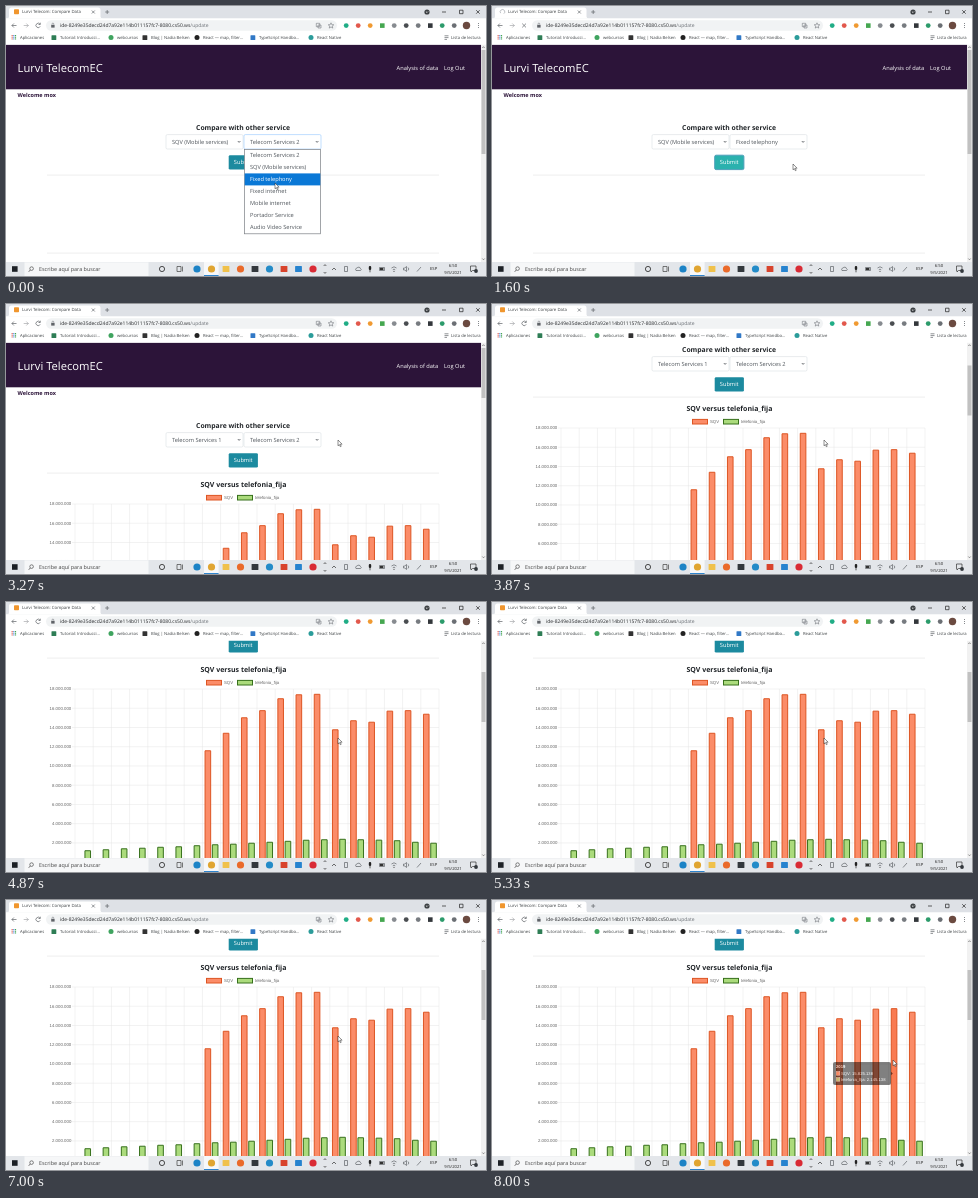
Animation, 480 px wide and 270 px high, one loop 8.07 s. Source, as an HTML page:

```html
<!DOCTYPE html>
<html lang="es">
<head>
<meta charset="utf-8">
<title>Compare Data</title>
<style>
html, body { margin: 0; width: 100%; height: 100%; overflow: hidden; background: #fff; }
svg { display: block; width: 100%; height: 100%; }
text { font-family: "Open Sans", "Noto Sans", sans-serif; text-rendering: geometricPrecision; white-space: pre; }
.b { font-weight: 700; }
.c { text-anchor: middle; }
.r { text-anchor: end; }
.h { font-family: "Liberation Sans", Arial, sans-serif; }
.line { fill: none; stroke: #5f6368; stroke-width: .7; }
</style>
</head>
<body>
<svg id="stage" viewBox="0 0 480 270" xmlns="http://www.w3.org/2000/svg"></svg>
<script>
const LOOP = 8070, FPS = 15;
const svg = document.getElementById('stage');

// markup helpers; text is placed by its vertical centre
const text = (x, cy, size, str, fill = '#3c4043', cls = '', id = '') =>
  `<text x="${x}" y="${(cy + size * .32).toFixed(2)}" font-size="${size}" fill="${fill}" class="${cls}" id="${id}">${str}</text>`;
const rect = (x, y, w, h, fill, more = '') =>
  `<rect x="${x}" y="${y}" width="${w}" height="${h}" fill="${fill}" ${more}/>`;
const dot = (x, y, r, fill, more = '') => `<circle cx="${x}" cy="${y}" r="${r}" fill="${fill}" ${more}/>`;
const path = (d, more = '') => `<path d="${d}" class="line" ${more}/>`;
const group = (id, body, more = '') => `<g id="${id}" ${more}>${body}</g>`;

// chart geometry, in page coordinates
const LEFT = 69, COL = 18.2, TOP = 200, ROW = 19.24, BASE = TOP + 9 * ROW, UNIT = ROW / 2;
const mobile = [0, 0, 0, 0, 0, 0, 0, 11.63, 13.45, 15.06, 15.8, 17.04, 17.45, 17.5, 13.81, 14.75, 14.6, 15.75, 15.8, 15.43];
const fixed = [1.24, 1.34, 1.44, 1.5, 1.6, 1.65, 1.76, 1.86, 1.92, 2.02, 2.12, 2.22, 2.33, 2.38, 2.43, 2.38, 2.34, 2.28, 2.12, 2.02];
const series = [
  { name: 'SQV', data: mobile, fill: '#fb8c68', hot: '#f97b52', line: '#dd5523', dx: -3.64 },
  { name: 'telefonia_fija', data: fixed, fill: '#abdb7c', hot: '#9bd164', line: '#37701c', dx: 3.64 }
];
const dotted = n => String(Math.round(n)).replace(/\B(?=(\d{3})+$)/g, '.');

function browser() {
  let s = rect(0, 0, 480, 12.5, '#dee1e6')
    + '<path d="M1 12.5Q3 12.5 3 10.5V4Q3 1.5 5.500 1.500H92Q94.500 1.500 94.500 4V10.500Q94.500 12.500 97 12.500Z" fill="#fff"/>'
    + rect(8, 3.3, 5, 5, '#f0962e', 'id="favicon" rx=".8"')
    + group('spinner', path('M2.300 0A2.300 2.300 0 1 1 0 -2.300', 'style="stroke:#a9adb3"'))
    + text(16, 6, 4.3, 'Lurvi Telecom: Compare Data')
    + path('M85.800 4.500l3 3m0 -3l-3 3M99.200 6h4m-2 -2v4')
    + dot(421, 6, 2.6, '#3c4043') + path('M419.900 5.500l1.100 1.100l1.100 -1.100', 'style="stroke:#fff"')
    + path('M436 6h4M453.500 4.200h3.500v3.500h-3.500zM470.200 4.200l3.500 3.500m0 -3.500l-3.500 3.500', 'style="stroke:#222"')
    + rect(0, 12.5, 480, 26, '#fff') + rect(40, 14.3, 291, 10.4, '#f1f3f4', 'rx="5.2"')
    + path('M10.500 19.500h-4.600m2 -2l-2 2l2 2') + path('M17.700 19.500h4.600m-2 -2l2 2l-2 2', 'opacity=".55"')
    + path('M34 18.200A2.200 2.200 0 1 0 34.200 20.300M34.300 16.700v1.800h-1.800', 'id="reload"')
    + path('M30.200 17.600l3.800 3.800m0 -3.800l-3.800 3.800', 'id="stop"')
    + rect(45.2, 19, 3.4, 2.6, '#5f6368') + path('M46 19v-1a.9 .9 0 0 1 1.800 0v1', 'style="stroke-width:.5"')
    + text(54, 19.6, 4.98, 'ide-8249e35decd24d7a92e114b011157fc7-8080.cs50.ws<tspan fill="#6d7278">/update</tspan>', '#26282b')
    + path('M310.300 17.300h3.400v3.400h-3.400zM312 19h3v3h-3z', 'style="stroke-width:.5"')
    + path('M325 16.800l.8 1.900l2 .1l-1.600 1.300l.6 2l-1.800 -1.100l-1.800 1.100l.6 -2l-1.600 -1.300l2 -.1z', 'style="stroke-width:.5"');
  const ext = ['#20ad86', '#e2584c', '#f09a32', '#45a750', '#878b90', '#4a4d51', '#777b80', '#33373b', '#2c9b6b', '#6b6f74'];
  ext.forEach((c, i) => s += i % 4 == 3 ? rect(338 + 12 * i, 17.3, 4.6, 4.6, c) : dot(340.2 + 12 * i, 19.6, 2.4, c));
  s += dot(460.5, 19.5, 3.7, '#6b4a40');
  [17.5, 19.5, 21.5].forEach(y => s += dot(472.5, y, .5, '#5f6368'));

  for (let i = 0; i < 9; i++) s += rect(5.6 + i % 3 * 1.7, 29 + (i / 3 | 0) * 1.7, 1.1, 1.1, ['#e2584c', '#4285d8', '#45a750'][i % 3]);
  [[14, 'Aplicaciones'], [54, 'Tutorial: Introducci...', '#2e7d55'], [111, 'webcursos', '#3fa45f'],
   [145, 'Blog | Nadia Belsen', '#333'], [197, 'React — map, filter...', '#222'],
   [253, 'TypeScript Handbo...', '#3178c6'], [311, 'React Native', '#2b9c9a']].forEach(([x, label, c], i) => {
    if (c) s += i % 2 ? rect(x - 8.5, 29.2, 4.8, 4.8, c, 'rx=".6"') : dot(x - 6, 31.6, 2.5, c);
    s += text(x, 31.5, 4.2, label);
  });
  return s + path('M438.500 29.800h4M438.500 31.600h4M438.500 33.400h2.500') + text(445, 31.5, 4.2, 'Lista de lectura');
}

function select(x, id) {
  return rect(x, 128.6, 77, 14.4, '#fff', `id="${id}Box" rx="1.3" stroke="#d3d8dd" stroke-width=".5"`)
    + text(x + 6, 136.3, 5.68, '', '#50565c', '', id)
    + path(`M${x + 71.8} 135l1.300 1.400l1.300 -1.400`, 'style="stroke:#343a40"');
}

function chart() {
  let s = text(237.5, 181, 7, 'SQV versus telefonia_fija', '#212529', 'b c');
  [[200, 0], [231, 1]].forEach(([x, k]) => {
    const d = series[k];
    s += rect(x + .5, 191.4, 15, 4.6, d.fill, `stroke="${d.line}"`) + text(x + 18, 193.8, 4.3, d.name, '#666', 'h');
  });
  let grid = '';
  for (let i = 0; i <= 9; i++) {
    grid += `M66 ${TOP + i * ROW}H433`;
    s += text(65.3, TOP + i * ROW, 4.35, i < 9 ? dotted((18 - 2 * i) * 1e6) : '0', '#666', 'h r');
  }
  for (let i = 0; i <= 20; i++) grid += `M${LEFT + i * COL} ${TOP}V${BASE + 3}`;
  s += `<path d="${grid}" fill="none" stroke="#e4e4e4" stroke-width=".5"/>`;
  series.forEach((d, k) => d.data.forEach((v, i) => {
    if (v) s += `<path id="bar${k}_${i}" fill="${d.fill}" stroke="${d.line}" stroke-width="1"/>`;
  }));
  const tip = rect(0, 0, 58, 23, '#000', 'rx="2" opacity=".8"')
    + '<path d="M58 9.700l1.800 1.800l-1.800 1.800z" opacity=".8"/>'
    + text(3, 5, 4.2, '', '#fff', 'h b', 'tip')
    + series.map((d, k) => rect(3.2, 9.6 + 6 * k, 3.6, 3.6, d.fill, 'stroke="#fff" stroke-width=".4"')
      + text(8, 11.4 + 6 * k, 4.2, '', '#fff', 'h', 'tip' + k)).join('');
  return s + group('tooltip', tip);
}

function menu() {
  let s = rect(238.4, 143.4, 76.2, 84.4, '#fff', 'stroke="#7b7f84" stroke-width=".7"') + rect(238.7, 167.4, 75.6, 12, '#0a78d6');
  ['Telecom Services 2', 'SQV (Mobile services)', 'Fixed telephony', 'Fixed internet', 'Mobile internet',
   'Portador Service', 'Audio Video Service'].forEach((label, i) =>
    s += text(244, 149.4 + 12 * i, 5.68, label, i == 2 ? '#fff' : '#50565c'));
  return s;
}

function page() {
  return rect(0, 38.5, 475, 44.8, '#2c1439')
    + text(11.6, 62, 11.2, 'Lurvi TelecomEC', '#fff')
    + text(390.6, 61.7, 5.7, 'Analysis of data', '#fff') + text(438, 61.7, 5.7, 'Log Out', '#fff')
    + text(11.6, 88.8, 5.5, 'Welcome mox', '#2c1439', 'b')
    + text(237, 122, 6.8, 'Compare with other service', '#212529', 'b c')
    + select(160, 'first') + select(238, 'second')
    + rect(222.7, 149.2, 29.2, 14.4, '#1c8a9f', 'id="button" rx="1.4"') + text(237.2, 156.5, 5.7, 'Submit', '#fff', 'c')
    + rect(41, 168.8, 392, .5, '#dcdcdc') + rect(41, 246.8, 392, .5, '#dcdcdc', 'id="rule"')
    + group('chart', chart()) + group('menu', menu());
}

function taskbar() {
  let s = rect(0, 256, 480, 14, '#e3e6ea') + rect(6, 260.2, 5.6, 5.6, '#1d2126')
    + rect(18.5, 256.3, 124, 13.7, '#f6f7f8') + dot(25.6, 262.6, 1.8, 'none', 'stroke="#333" stroke-width=".6"')
    + path('M24.300 264l-1.600 1.800', 'style="stroke:#333"') + text(33, 263.2, 5.4, 'Escribe aquí para buscar', '#444')
    + dot(156, 263, 2.6, 'none', 'stroke="#222" stroke-width=".8"')
    + path('M171 260.500h4v5h-4zM176.500 260.500v5', 'style="stroke:#444"')
    + rect(198, 256, 14.6, 14, '#f7f8f9') + rect(198, 269.1, 14.6, .9, '#1878c9');
  ['#1c83c6', '#e0a531', '#f0c14a', '#ea6a2a', '#33383d', '#238bc8', '#d8432c', '#2683cf', '#d92b35'].forEach((c, i) => {
    const x = 191 + 14.5 * i;
    s += [2, 4, 6, 7].includes(i) ? rect(x - 3.4, 260, 6.8, 6, c, 'rx=".6"') : dot(x, 263, 3.6, c);
  });
  s += path('M317.700 260l1.300 -1.400l1.300 1.400M317.700 266l1.300 1.400l1.300 -1.400M326 264l2 -2l2 2', 'style="stroke:#333"')
    + path('M338.500 260.500h3v5h-3zM350 264.500a1.500 1.500 0 0 1 1 -2.500a2 2 0 0 1 3.600 .8a1 1 0 0 1 0 1.700z')
    + rect(362.8, 260, 2.4, 4, '#222', 'rx="1"') + path('M364 264v2.300', 'style="stroke:#222"')
    + path('M373.500 261.500h5v3h-5z') + rect(374, 262, 3.4, 2, '#333')
    + path('M385.500 262a3.600 3.600 0 0 1 5 0M386.800 263.700a1.800 1.800 0 0 1 2.400 0') + dot(388, 265.3, .6, '#444')
    + path('M397.500 262h1.300l1.700 -1.500v5l-1.700 -1.500h-1.300zM402 261.500a2 2 0 0 1 0 3M411 265.500l4 -4.500')
    + text(427.6, 263, 4.2, 'ESP', '#222', 'c') + text(447, 259.7, 4.2, '6:50', '#222', 'c')
    + text(447, 266.6, 4.2, '9/5/2021', '#222', 'c')
    + path('M464.500 260h5.500v4.500h-3.500l-1.500 1.500v-1.500h-.5z', 'style="stroke:#333"') + dot(470, 265, 1.9, '#33383d');
  return s;
}

svg.innerHTML = '<defs><clipPath id="view"><rect x="0" y="38.500" width="475" height="217.500"/></clipPath></defs>'
  + rect(0, 0, 480, 270, '#fff')
  + group('', group('page', page()), 'clip-path="url(#view)"')
  + rect(475, 38.5, 5, 217.5, '#f1f1f1') + rect(475.5, 44, 4, 50, '#c1c1c1', 'id="thumb"')
  + path('M476.300 42l1.200 -1.300l1.200 1.300M476.300 252.500l1.200 1.300l1.200 -1.300', 'style="stroke:#666"')
  + browser() + taskbar()
  + '<path id="cursor" d="M0 0V5.800L1.350 4.600L2.300 6.700L3.200 6.300L2.300 4.200H4.100Z" fill="#fff" stroke="#222" stroke-width=".5"/>';

const el = {};
svg.querySelectorAll('[id]').forEach(n => { if (n.id) el[n.id] = n; });

// keys: [time, value, ...]; each leg eases in and out
function track(keys, t) {
  let i = 0;
  while (i < keys.length - 1 && keys[i + 1][0] <= t) i++;
  const a = keys[i], b = keys[i + 1];
  if (!b || t <= a[0]) return a.slice(1);
  const p = (t - a[0]) / (b[0] - a[0]), e = p * p * (3 - 2 * p);
  return a.slice(1).map((v, k) => v + (b[k + 1] - v) * e);
}

const PICK = 270, CLICK = 1270, LOAD = 2200;
const pointer = [[0, 269, 177], [70, 269, 177], [130, 268, 175], [270, 268, 175], [640, 252, 166], [1070, 236, 154],
  [1270, 236, 154], [1600, 301, 158], [2060, 332, 136], [7400, 332, 136], [7530, 341, 118], [7670, 358, 99],
  [7800, 381, 99], [8000, 401, 160]];
const scrolling = [[3290, 0], [3500, 37.5], [3600, 37.5], [3860, 76], [3880, 76], [4130, 113]];
const tipPlace = [[7700, 272, 283], [7780, 290, 281], [8000, 341, 275]];
const tipFade = [[7400, 0], [7530, .45], [7600, .45], [7730, 0], [7800, 0], [8000, .62]];

const show = (node, on) => node.setAttribute('visibility', on ? 'visible' : 'hidden');
const move = (node, x, y) => node.setAttribute('transform', `translate(${x} ${y})`);

function draw(t) {
  const loaded = t >= LOAD, busy = t >= CLICK + 60 && !loaded, pressed = t >= CLICK && !loaded;
  const [scroll] = track(scrolling, t);
  move(el.page, 0, -scroll);
  el.thumb.setAttribute('y', 44 + scroll * .23);
  el.thumb.setAttribute('height', loaded ? 50 : 104);

  show(el.favicon, !busy);
  show(el.spinner, busy);
  show(el.reload, !busy);
  show(el.stop, busy);
  el.spinner.setAttribute('transform', `translate(10.5 5.8) rotate(${-t * .36})`);

  show(el.menu, t < PICK);
  show(el.rule, !loaded);
  el.first.textContent = loaded ? 'Telecom Services 1' : 'SQV (Mobile services)';
  el.second.textContent = t < PICK || loaded ? 'Telecom Services 2' : 'Fixed telephony';
  el.secondBox.setAttribute('stroke', t < CLICK ? '#80bdff' : '#d3d8dd');
  el.button.setAttribute('fill', pressed ? '#2bb1ae' : t > 930 && t < CLICK ? '#15798d' : '#1c8a9f');
  el.button.setAttribute('stroke', pressed ? '#4f9fba' : 'none');

  el.chart.style.display = loaded ? '' : 'none';
  if (loaded) {
    const grow = 1 - Math.pow(1 - Math.min(1, (t - LOAD) / 1000), 4);
    const hover = t >= 7850 ? 18 : t >= 7460 && t < 7600 ? 14 : -1;
    series.forEach((d, k) => d.data.forEach((v, i) => {
      if (!v) return;
      const bar = el[`bar${k}_${i}`], x = LEFT + (i + .5) * COL + d.dx;
      bar.setAttribute('d', `M${x - 2.8} ${BASE}V${BASE - v * UNIT * grow + .5}H${x + 2.8}V${BASE}`);
      bar.setAttribute('fill', i == hover ? d.hot : d.fill);
    }));
    const year = t < 7780 ? 14 : 18;
    el.tip.textContent = 2001 + year;
    series.forEach((d, k) => el['tip' + k].textContent = `${d.name}: ${dotted(d.data[year] * 1e6 + 25138)}`);
    move(el.tooltip, ...track(tipPlace, t));
    el.tooltip.setAttribute('opacity', track(tipFade, t)[0]);
  }
  move(el.cursor, ...track(pointer, t));
}

function frame() {
  const t = performance.now() % LOOP;
  draw(Math.floor(t * FPS / 1000) * 1000 / FPS);
  requestAnimationFrame(frame);
}
frame();
</script>
</body>
</html>
```
